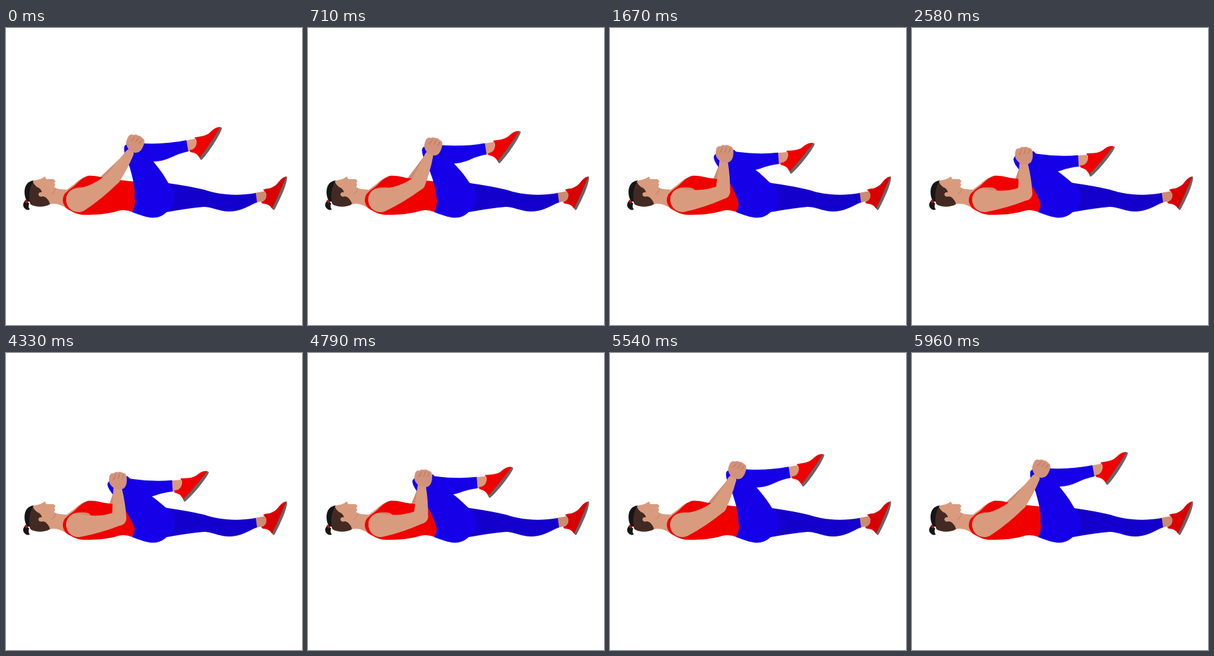
These frames come from a looping animation (448x450 px, 6 s). An HTML page:

```html
<!DOCTYPE html>
<html lang="en">
<head>
<meta charset="utf-8">
<title>Knee to chest stretch</title>
<style>
  @property --p { syntax: "<number>"; inherits: true; initial-value: 0; }
  html, body { margin: 0; width: 100%; height: 100%; overflow: hidden; background: #fff; }
  svg {
    display: block; width: 448px; height: 450px;
    --skin: #d99b7e; --shade: #cb8c70; --near: #1500e8; --far: #1400cc; --red: #f00000;
    animation: pull 6s infinite;
  }
  /* --p: 0 = leg released, 1 = knee pulled in */
  @keyframes pull {
    0% { --p: 0; }
    2.5% { --p: 0; animation-timing-function: cubic-bezier(.33, .1, .4, 1); }
    43% { --p: 1; }
    71.8% { --p: 1; animation-timing-function: cubic-bezier(.4, 0, .55, 1); }
    99.3%, 100% { --p: 0; }
  }
  .skin { fill: var(--skin); }
  .shade { fill: var(--shade); }
  .near { fill: var(--near); }
  .far { fill: var(--far); }
  .red { fill: var(--red); }
  .sole { fill: #666; }
  .line { fill: none; stroke: #b97b61; stroke-width: 1.3; stroke-linecap: round; }
  #thigh { transform-origin: 222px 262px; transform: rotate(calc(var(--p) * -20deg)); }
  #shin { transform-origin: 195px 189px; transform: rotate(calc(var(--p) * 26.7deg)); }
  #hand {
    transform-origin: 0 0;
    transform: translate(calc(195px - var(--p) * 25.5px), calc(175px + var(--p) * 18.5px))
               rotate(calc(22deg - var(--p) * 22deg));
  }
</style>
</head>
<body>
<svg id="stage" viewBox="0 0 448 450">
  <!-- straight leg -->
  <path class="shade" d="M376 250 L393 247 L396 260 L378 265Z"/>
  <path class="far" d="M240 234 L245 235 Q274 239 300 245 C318 251 344 256 378 250 L380 264 C366 270 356 278 336 278 C320 277 312 271 299 271 Q276 273 243 279Z"/>
  <path d="M391 247 L389 245 Q394 243 399 243 Q409 239 412 234 C416 229 420 225 425 225 L422 236 L404.500 275 L402 273 Q398 266 388 266 L386 263 Q393 262 394 256 Q395 250 391 247Z" fill="#d80000"/>
  <path class="sole" d="M424 225 L425.500 227 Q424.500 236 419 249 Q413 263 406.500 275 L404.500 276 L403 273 Q409.500 260 414.500 248 Q420 236 424 225Z"/>

  <path id="farArm" class="shade"/>

  <!-- neck and head -->
  <path class="skin" d="M40 232 C46 230 50 230 54 228 L59 225 L61 229 L72 229 L75 232 L73 235 L74.500 237 L73 241 Q75 243 80 244 L92 245 L104 236 Q111 229 119 226 L102 262 L92 274 Q80 264 66 267 L50 262 L36 248Z"/>
  <path class="line" d="M75 243 Q75 248 69 252" stroke-opacity=".5"/>
  <path d="M40 232 C33 240 32 256 37 267 C45 272 58 272 66.500 267 Q66 262 60 256.500 L56 255 Q50 257 49 252 Q50 248 54.500 249 Q53 243 47 241 Q42 237 40 232Z" fill="#422a22"/>
  <path d="M42 231 C36 240 34 251 36 263 L32 263 C27 255 26 240 34 234 Q38 231 42 231Z" fill="#161616"/>
  <path d="M31 261 C25 263 25 270 28 273 Q31 277 36 275 Q33 271 35 266Z" fill="#161616"/>
  <path d="M29 260 L33 263 L32 266 L28 263Z" fill="#b80f0f"/>

  <!-- torso -->
  <path class="red" d="M89 251 Q95 245 101 241 C110 234 114 227 124 224 C136 223 144 227 156 228 Q174 231 200 233 L204 262 L192 279 Q180 274 170 277 C154 282 138 283 118 283 C106 283 99 277 94 275 C85 268 84 259 89 251Z"/>
  <path class="shade" d="M91 257 C94 246 103 241 114 241.500 C121 241 125 242 128 245 L124 258Z"/>

  <!-- bent leg -->
  <path class="near" d="M191 279 Q194.500 272 195.500 263 L194 253 L214 234 L243 235 C253 241 256 250 255 262 C254 270 248 275 243 279 C238 284 231 287.500 222 287.500 C212 287 202 283 191 279Z"/>
  <g id="thigh">
    <path class="near" d="M195 257 Q195 240 191 225 Q188 211 182 197 Q178 187 179 180 Q180 176 186 175.500 L212 178 L222 201 Q231 212 238 222 L244 232 L252 246 L236 268 L210 272Z"/>
    <g id="shin">
      <path class="skin" d="M270 171 L287 167.500 L289 180 L280 187 L272 187Z"/>
      <path class="near" d="M184 177 Q196 173 212 175 Q244 176 273 170 L276 187 Q262 190 250 196 Q237 202 222 202.500 L202 204 L186 190Z"/>
      <path class="red" d="M287 168 L285 166 Q290 165 296 164 Q305 162 309 158 C314 153 318 150 324 150 L325 156 L295 199 L291 194 Q288 189 279 188 L278 185 Q286 184 288 177 Q289 171 287 168Z"/>
      <path class="sole" d="M324.500 150 L327 151.500 Q325 159 313.500 177 Q305 190 297 199 L295 200 L293 197 Q302 185 310 173 Q319 160 324.500 150Z"/>
    </g>
  </g>

  <!-- near arm -->
  <path id="upper" class="skin"/>
  <path id="fore" class="skin"/>
  <g id="hand">
    <path fill="#d3937a" d="M-13 -7 Q-11 -12 -7 -11 Q-4 -14 0 -13 Q4 -14.500 7 -12 Q12 -12 13 -6 Q14 2 12 7 Q10 12 5 13 L-3 13 Q-11 9 -13 3 Q-14 -2 -13 -7Z"/>
    <path class="line" d="M-4 -9 Q-4 -5 -7 -2 M2 -10 Q2 -6 0 -3 M8 -9 Q8 -5 6 -3"/>
  </g>
</svg>
<script>
  const stage = document.getElementById("stage");
  const part = id => document.getElementById(id);
  const [upper, fore, farArm] = ["upper", "fore", "farArm"].map(part);
  const SHOULDER = [109.5, 260.5], UPPER = 62.5, FORE = 44.5;

  // Tapered limb between two round joints; top and under bend its two sides.
  function limb(el, [ax, ay], ra, [bx, by], rb, top = 0, under = 0) {
    const d = Math.hypot(bx - ax, by - ay);
    const nx = (ay - by) / d, ny = (bx - ax) / d;
    const at = (x, y, r) => `${(x + nx * r).toFixed(2)} ${(y + ny * r).toFixed(2)}`;
    const mx = (ax + bx) / 2, my = (ay + by) / 2, rm = (ra + rb) / 2;
    el.setAttribute("d",
      `M${at(ax, ay, ra)} A${ra} ${ra} 0 0 1 ${at(ax, ay, -ra)}` +
      `Q${at(mx, my, top - rm)} ${at(bx, by, -rb)}` +
      `A${rb} ${rb} 0 0 1 ${at(bx, by, rb)}` +
      `Q${at(mx, my, under + rm)} ${at(ax, ay, ra)}Z`);
  }

  function elbowFor([wx, wy]) {
    const [sx, sy] = SHOULDER;
    const d = Math.hypot(wx - sx, wy - sy);
    const cos = (UPPER ** 2 + d ** 2 - FORE ** 2) / (2 * UPPER * d);
    const a = Math.atan2(wy - sy, wx - sx) + Math.acos(Math.min(1, cos));
    return [sx + UPPER * Math.cos(a), sy + UPPER * Math.sin(a)];
  }

  function draw() {
    const p = parseFloat(getComputedStyle(stage).getPropertyValue("--p")) || 0;
    const wrist = [187 - 18 * p, 190 + 16 * p];
    const elbow = elbowFor(wrist);
    limb(upper, SHOULDER, 18.5, elbow, 11, 11, 3);
    limb(fore, elbow, 11, wrist, 6.5, 0, 2);
    limb(farArm, [elbow[0] - 17, elbow[1] + 6], 7, [183 - 12 * p, 196 + 9 * p], 6);
    requestAnimationFrame(draw);
  }
  draw();
</script>
</body>
</html>
```
